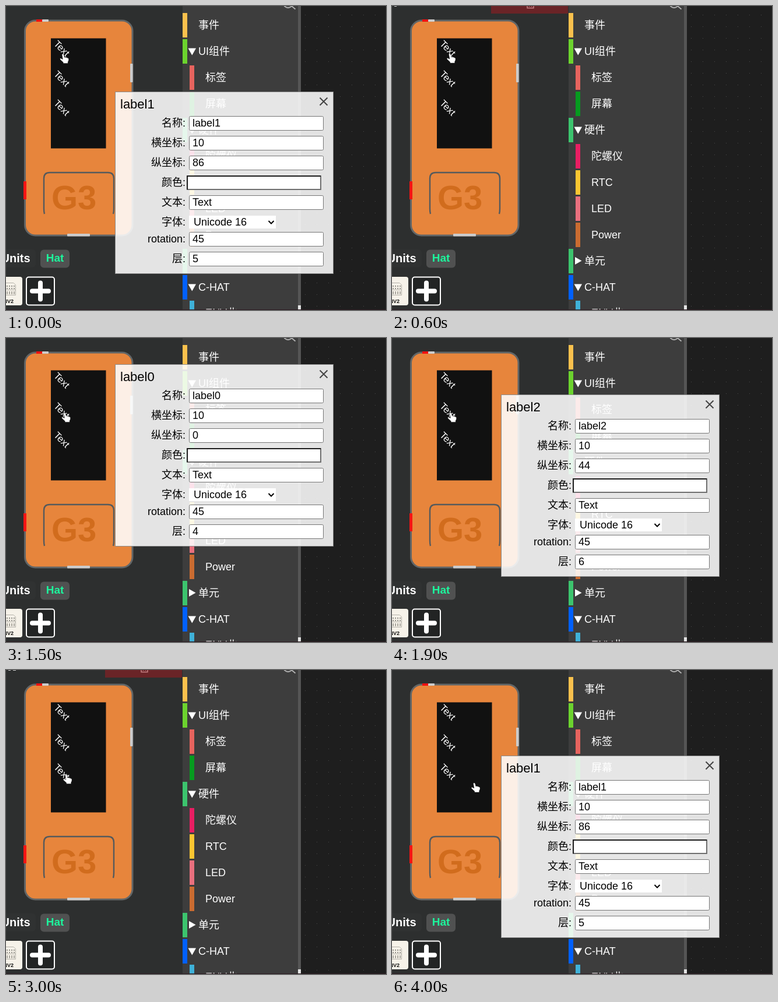
Animation, 652 px wide and 522 px high, one loop 4200 ms. Source, as an HTML page with a canvas:

```html
<!DOCTYPE html>
<html lang="zh">
<head>
<meta charset="utf-8">
<style>
html, body { margin: 0; width: 100%; height: 100%; overflow: hidden; background: #2d2f2f; }
canvas { display: block; }
</style>
</head>
<body>
<canvas id="stage" width="652" height="522"></canvas>
<script>
const ctx = document.getElementById('stage').getContext('2d', { alpha: false });
const LOOP = 4200;
const FAMILY = '"Liberation Sans", "Noto Sans CJK SC", "Noto Sans CJK", sans-serif';

// [start ms, x, y] of the hand pointer
const POINTER = [
  [0, 92, 82], [200, 93.5, 81.5], [800, 95, 88], [1000, 105, 125], [1200, 99, 128], [1500, 95, 128],
  [2100, 101, 131], [2200, 110, 140], [2300, 118, 152], [2400, 120, 164], [2500, 112, 174],
  [2600, 99, 179], [2700, 97.5, 179], [3400, 132, 193], [3600, 134, 193], [4000, 135.5, 193.5]
];

const LABELS = [
  { name: 'label0', y: 0, layer: 4, top: 46 },
  { name: 'label1', y: 86, layer: 5, top: 148 },
  { name: 'label2', y: 44, layer: 6, top: 98 }
];

// [start ms, label whose dialog is open]
const DIALOGS = [
  [0, LABELS[1]], [600, null], [700, LABELS[0]], [1900, LABELS[2]], [3000, null], [3100, LABELS[1]]
];

// [text, colour, level, arrow]
const MENU = [
  ['事件', '#fbc14d', 0], ['UI组件', '#6cd32e', 0, 'down'], ['标签', '#e7645e', 1], ['屏幕', '#069b1f', 1],
  ['硬件', '#3cc46e', 0, 'down'], ['陀螺仪', '#e91e63', 1], ['RTC', '#fcc631', 1], ['LED', '#e9707e', 1],
  ['Power', '#cb6c31', 1], ['单元', '#3cc46e', 0, 'right'], ['C-HAT', '#0060ff', 0, 'down'], ['ENV北', '#3fb1d8', 1]
];

const at = (steps, t) => steps.filter(s => s[0] <= t).pop();

function rect(x, y, w, h, color) {
  ctx.fillStyle = color;
  ctx.fillRect(x, y, w, h);
}

function rounded(x, y, w, h, r, fill, stroke, width = 1) {
  ctx.beginPath();
  ctx.roundRect(x, y, w, h, r);
  if (fill) { ctx.fillStyle = fill; ctx.fill(); }
  if (stroke) { ctx.strokeStyle = stroke; ctx.lineWidth = width; ctx.stroke(); }
}

function text(str, x, y, size, color, align = 'left', weight = '') {
  ctx.font = `${weight} ${size}px ${FAMILY}`;
  ctx.textAlign = align;
  ctx.fillStyle = color;
  ctx.fillText(str, x, y);
}

function path(d, stroke, width, fill) {
  const p = new Path2D(d);
  if (fill) { ctx.fillStyle = fill; ctx.fill(p); }
  if (stroke) { ctx.strokeStyle = stroke; ctx.lineWidth = width; ctx.stroke(p); }
}

function drawDevice() {
  rounded(32.5, 25, 184.5, 369, 18, '#e7853c', '#626667', 3);
  rect(52, 23, 10, 4, '#f01010');
  rounded(62, 23, 11, 4, 1, '#cccccc');
  rounded(213, 99, 4.5, 32, 1, '#cccccc');
  rect(30, 301, 5, 31, '#f81414');
  rounded(105, 391, 39, 4.5, 1, '#cccccc');
  rect(77, 55.5, 94.5, 189, '#111111');
  for (const y of [66, 118, 168]) {
    ctx.save();
    ctx.translate(81, y);
    ctx.rotate(Math.PI / 4);
    text('Text', 0, 0, 16.5, '#ffffff');
    ctx.restore();
  }
  path('M66 357 Q65 354 65 348 V296 Q65 286 75 286 H175 Q185 286 185 296 V348 Q185 354 184 357', '#555a5c', 2.4);
  text('G3', 78, 349, 58, '#d16c1d', 'left', 'bold');
}

function drawUnits() {
  rounded(-10, 418, 61, 31, 6, '#303232');
  text('Units', 41.5, 440, 20, '#ffffff', 'right', 'bold');
  rounded(59, 418.5, 50, 31, 6, '#505151');
  text('Hat', 84, 439, 19, '#1df59c', 'center', 'bold');

  rounded(-20, 465, 48, 49, 4, '#f6f2e9');
  path('M-4 475.5 H13 L16.5 479 V496.5 H-4 M0 487.5 H16', '#b5b2aa', 1);
  for (let x = 1; x < 15; x += 4) {
    rect(x, 480, 2, 2, '#8f8d86');
    rect(x, 484, 2, 2, '#8f8d86');
    rect(x, 490, 2, 5, '#aaa79f');
  }
  text('NV2', 13, 510, 9, '#111111', 'right', 'bold');

  rounded(35, 465.5, 48, 48, 4, '#222424', '#ffffff', 2);
  ctx.lineCap = 'round';
  path('M45 489.5 H73 M59 475.5 V503.5', '#ffffff', 8);
  ctx.lineCap = 'butt';
}

function drawMenu() {
  rect(303, 0, 198, 522, '#3d3d3d');
  rect(501, 0, 5, 522, '#555555');
  rect(501, 514, 5, 8, '#e4e4e4');
  path('M476 -5 a8 8 0 0 0 16 0 M490 0 L496.5 5.5', '#b4b4b4', 1.8);
  MENU.forEach(([label, color, level, arrow], i) => {
    const y = Math.round(33 + 44.95 * i);
    rect(303 + 12 * level, y - 21, 8, 42, color);
    if (arrow === 'down') path(`M312.5 ${y - 5.5} h13.5 l-6.75 12 z`, null, 0, '#ffffff');
    if (arrow === 'right') path(`M314 ${y - 7} v13 l11.5 -6.5 z`, null, 0, '#ffffff');
    text(label, 330 + 12 * level, y + 6, 18, '#ffffff');
  });
}

function drawWorkspace() {
  rect(506, 0, 146, 522, '#1e1e1e');
  for (let x = 513; x < 652; x += 20)
    for (let y = 15; y < 520; y += 20) rect(x, y, 1, 1, '#4c4c4c');
}

function drawToolbar(t) {
  rect(170, 0, 132, 13, '#6a2427');
  path('M232 0 V3.5 H243 V0 M235.5 0 V1 M239.5 0 V1', '#c98487', 1.4);
  rect(4, 0, 4, 1, '#cccccc');
  if (t > 2000) rect(12, 0, 5, 1, '#cccccc');
}

function drawDialog({ name, y, layer, top }) {
  ctx.save();
  ctx.translate(0, top);
  rect(187, -1, 375, 313, 'rgba(255,255,255,0.87)');
  ctx.strokeStyle = '#8c8c8c';
  ctx.lineWidth = 1;
  ctx.strokeRect(187.5, -0.5, 374, 312);
  text(name, 196, 28, 22, '#000000');
  path('M538.5 9.5 L551.5 22.5 M551.5 9.5 L538.5 22.5', '#444444', 2);

  const rows = [
    ['名称', 53, name], ['横坐标', 87, 10], ['纵坐标', 121, y], ['颜色', 155], ['文本', 189, 'Text'],
    ['字体', 223, 'Unicode 16'], ['rotation', 252, 45], ['层', 286, layer]
  ];
  for (const [label, mid, value] of rows) {
    text(label + ':', 308, mid + 6, 18, '#000000', 'right');
    if (label === '颜色') {
      rect(310, mid - 12, 231, 25, '#6f6f6f');
      rect(310, mid - 12, 230, 24, '#1c1c1c');
      rect(312, mid - 10, 227, 21, '#ffffff');
      rect(539, mid - 10, 2, 23, '#6f6f6f');
      rect(312, mid + 11, 229, 2, '#6f6f6f');
    } else if (label === '字体') {
      rect(314, mid - 11, 149, 22, '#ffffff');
      text(value, 322, mid + 6, 18, '#000000');
      path(`M450.5 ${mid - 2} l4.5 4.5 l4.5 -4.5`, '#000000', 2);
    } else {
      rounded(314.5, mid - 11.5, 230, 24, 2, '#ffffff', '#767676');
      text(value, 320, mid + 6, 18, '#000000');
    }
  }
  ctx.restore();
}

function drawPointer(x, y) {
  ctx.save();
  ctx.translate(x, y);
  path('M4 1.8 Q4.2 0 6 0.4 Q7.2 0.8 7.5 2.5 L8.3 6.2 Q10 5.2 11 6.5 Q12.5 5.8 13.3 7.2 ' +
       'Q15.4 6.8 15.6 9 Q15.8 12 14.2 14 V16.5 H6.2 V14.8 L1 10 Q0 8.4 1.6 7.8 L5.4 9.4 Z',
       'rgba(0,0,0,0.5)', 0.8, '#ffffff');
  ctx.restore();
}

const start = performance.now();

function frame() {
  const t = (performance.now() - start) % LOOP;
  const dialog = at(DIALOGS, t)[1];
  const [, x, y] = at(POINTER, t);
  rect(0, 0, 652, 522, '#2d2f2f');
  drawDevice();
  drawUnits();
  drawMenu();
  drawWorkspace();
  rect(0, 521, 652, 1, '#2b1a20');
  if (dialog) drawDialog(dialog);
  else drawToolbar(t);
  drawPointer(x, y);
  requestAnimationFrame(frame);
}

frame();
</script>
</body>
</html>
```
